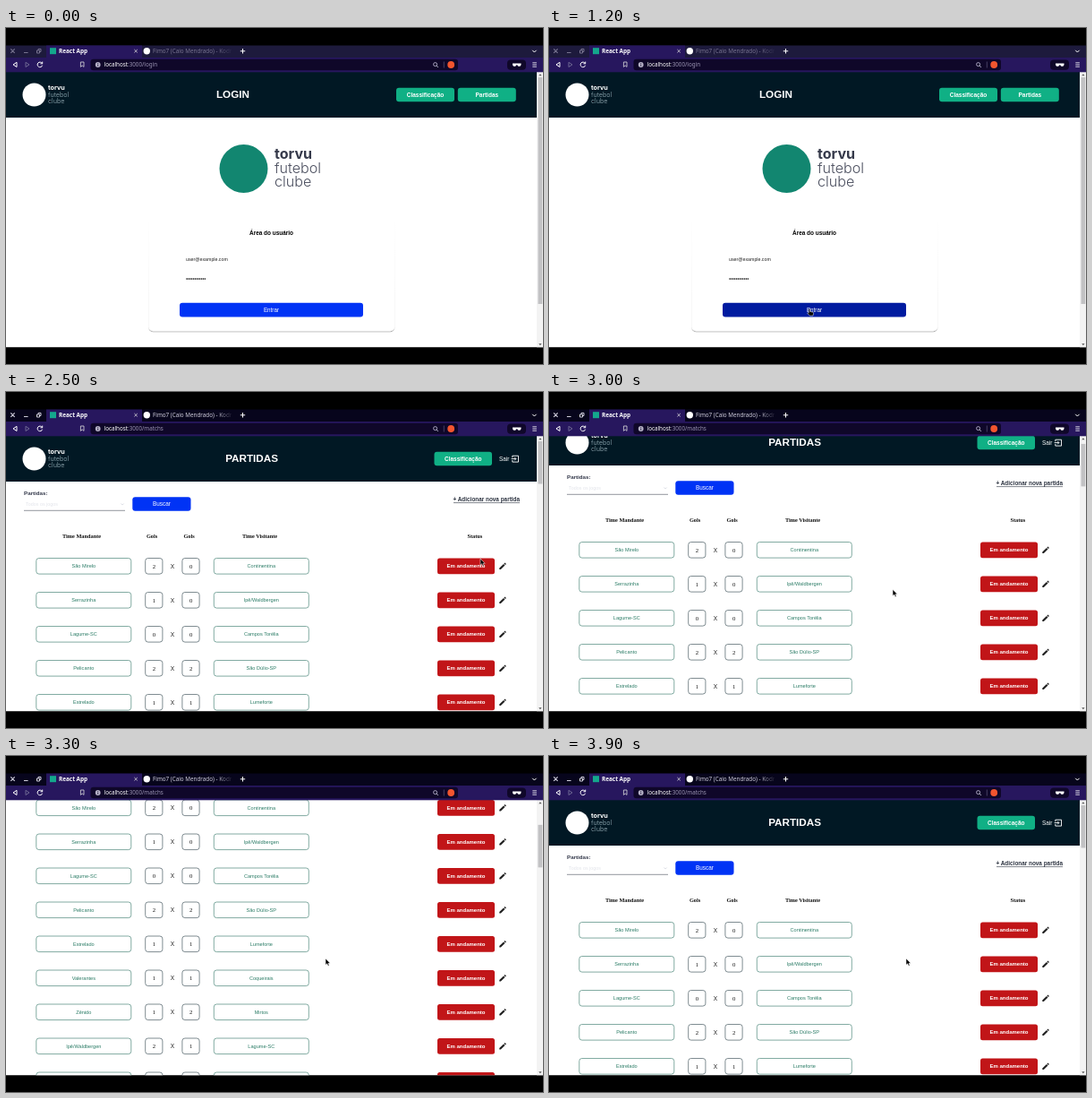
Write an HTML page that moves like this. It is 600 px wide and 375 px high and loops after 4 s.

```html
<!DOCTYPE html>
<html lang="pt">
<head>
<meta charset="utf-8">
<title>Partidas</title>
<style>
  html, body { margin: 0; width: 100%; height: 100%; overflow: hidden; background: #000; }
  svg { display: block; width: 600px; height: 375px; }
  text { font-family: "Liberation Sans", Arial, sans-serif; white-space: pre; }
  .ui { font-family: "Noto Sans", "Open Sans", sans-serif; }
  .serif { font-family: "Liberation Serif", "Times New Roman", serif; }
  .brand { font-family: Inter, sans-serif; }
  .b { font-weight: 700; }
  .m { text-anchor: middle; }
  .e { text-anchor: end; }
  .line { fill: none; stroke-width: 1; }
</style>
</head>
<body>
<svg id="stage" viewBox="0 0 600 375" xmlns="http://www.w3.org/2000/svg"></svg>
<script>
const LOOP = 4000, STEP = 100;
const FOCUS = 1300, LOADING = 1500, TABLE = 1700;

const text = (x, y, size, fill, cls, str, extra = '') =>
  `<text x="${x}" y="${y}" font-size="${size}" fill="${fill}" class="${cls}" ${extra}>${str}</text>`;
const rect = (x, y, w, h, fill, r = 0, extra = '') =>
  `<rect x="${x}" y="${y}" width="${w}" height="${h}" rx="${r}" fill="${fill}" ${extra}/>`;
const line = (d, stroke, extra = '') => `<path class="line" d="${d}" stroke="${stroke}" ${extra}/>`;
const button = (x, y, w, h, fill, label, cls = 'b', size = 6.5, id = '') =>
  rect(x, y, w, h, fill, 3, id && `id="${id}"`) +
  text(x + w / 2, y + h / 2 + 2.2, size, '#fff', cls + ' m', label);

const GREEN = '#10b085', BLUE = '#0033f5', NAVY = '#011824';

function brand(x, y, size, gap, bold, thin) {
  return ['torvu', 'futebol', 'clube'].map((word, i) =>
    text(x, y + i * gap, size, i ? thin : bold, 'brand', word,
      `font-weight="${i ? 300 : 700}"`)).join('');
}

const headerLogo = `<circle cx="31.5" cy="74.5" r="13" fill="#fff"/>` +
  brand(47, 69, 7.2, 7.6, '#fff', '#9fb4bd');

const exitIcon = line('M565.8 73.2V71.2h6.7v6.9h-6.7V76M564.6 74.6h5.2M568.2 72.9l1.7 1.7-1.7 1.7', '#fff',
  'style="stroke-width:.9"');

const menuButtons = button(478.5, 66.8, 64.5, 15.4, GREEN, 'Classificação') +
  text(551, 77, 6.4, '#fff', '', 'Sair') + exitIcon;

const addLink = text(574, 122.4, 6.4, '#2c3340', 'b e', '+ Adicionar nova partida') +
  line('M500 123.6h74', '#2c3340', 'style="stroke-width:.6"');

const filter = text(20, 114.5, 6.2, '#33384a', 'b', 'Partidas:') +
  text(22, 127, 5.4, '#e2e4ea', '', 'Todos os jogos') +
  line('M128.5 124.5l1.6 1.6 1.6-1.6', '#cfd2da', 'style="stroke-width:.7"') +
  line('M20 132.3h113', '#777c86', 'style="stroke-width:.8"') +
  button(141.3, 117.3, 65.2, 15.4, BLUE, 'Buscar', '', 6.4);

const title = (x, str) => text(x, 78.3, 11.7, '#fff', 'b m', str);

function loginPage() {
  let dots = '';
  for (let i = 0; i < 12; i++) dots += `<circle cx="${202 + i * 1.85}" cy="280" r=".8"/>`;
  return rect(0, 49, 594, 51, NAVY) + headerLogo + title(253.5, 'LOGIN') +
    button(436, 66.8, 65, 15.4, GREEN, 'Classificação') +
    button(504.8, 66.8, 65, 15.4, GREEN, 'Partidas') +
    `<circle cx="265.5" cy="157" r="27" fill="#128670"/>` +
    brand(300, 146, 16.1, 15.7, '#363a4b', '#4a4e5e') +
    rect(159.3, 212, 275, 126.3, '#fff', 5, 'filter="url(#shade)"') +
    rect(157, 206, 280, 110, 'url(#fade)') +
    text(296.5, 231, 6.45, '#000', 'b m', 'Área do usuário') +
    text(201, 260, 5.25, '#222', '', 'user@example.com') + dots +
    button(194, 306.8, 205, 15.6, BLUE, 'Entrar', '', 6.3, 'enter');
}

function loadingPage() {
  return rect(0, 49, 600, 51, NAVY) + title(278, 'PARTIDAS') +
    `<g transform="translate(6.5)">${menuButtons}${addLink}</g>` + filter +
    text(0, 147, 6.4, '#000', 'serif', 'Loading...');
}

const matches = [
  ['São Mirelo', 2, 0, 'Continentina'], ['Serrazinha', 1, 0, 'Ipê/Waldbergen'],
  ['Lagume-SC', 0, 0, 'Campos Torélia'], ['Pelicanto', 2, 2, 'São Dúlio-SP'],
  ['Estrelado', 1, 1, 'Lumeforte'], ['Valerantes', 1, 1, 'Coqueirais'],
  ['Zênido', 1, 2, 'Mirtos'], ['Ipê/Waldbergen', 2, 1, 'Lagume-SC'],
  ['Continentina', 0, 1, 'Estrelado'], ['Lumeforte', 1, 0, 'Zênido']
];

function matchRow([home, a, b, away], i) {
  const team = (x, name) => rect(x, -9, 106, 17.6, '#fff', 3, 'stroke="#588f83" stroke-width=".75"') +
    text(x + 53, 1.7, 5.6, '#2b7c66', 'm', name);
  const goals = (x, n) => rect(x, -9, 19.2, 17.6, '#fff', 3, 'stroke="#55666c" stroke-width=".75"') +
    text(x + 9.7, 2.4, 6.7, '#111', 'serif m', n);
  return `<g transform="translate(0 ${194.5 + 38 * i})">` +
    team(33.8, home) + goals(155.7, a) + text(186, 2.4, 6.6, '#222', 'm', 'X') +
    goals(196.9, b) + team(232.3, away) +
    rect(482, -9, 64, 17.8, '#c11518', 2.5) + text(514, 1.5, 6, '#fff', 'b m', 'Em andamento') +
    `<path transform="translate(550 -5.2) scale(.42)" fill="#222" d="M3 17.25V21h3.75L17.8 9.94 14.06 6.2zM20.7 7.04a1 1 0 0 0 0-1.41l-2.34-2.34a1 1 0 0 0-1.41 0l-1.83 1.83 3.75 3.75z"/></g>`;
}

function tablePage() {
  const heads = [[84.5, 'Time Mandante'], [163, 'Gols'], [204.5, 'Gols'],
    [283.5, 'Time Visitante'], [523.8, 'Status']];
  return rect(0, 49, 594, 51, NAVY) + headerLogo + title(274.6, 'PARTIDAS') +
    menuButtons + addLink + filter +
    heads.map(([x, s]) => text(x, 163.4, 6.3, '#111', 'serif b m', s)).join('') +
    matches.map(matchRow).join('');
}

function browser() {
  const w = '#fff', dim = '#6d6792';
  return rect(0, 19.5, 600, 14, '#1d1a3c', 0, 'id="strip"') + rect(45, 19.5, 107, 14, '#27175e') +
    rect(0, 33, 600, 16.3, '#27175e') +
    `<g id="chrome">` +
    line('M5.3 23.4l4.4 4.4M9.7 23.4l-4.4 4.4M20 27.5h4.6', 'currentColor', 'style="stroke-width:1.2"') +
    line('M34.5 25h3v3h-3zM36 25v-1.6h3v3h-1.5', 'currentColor') +
    text(164, 28.1, 6.3, 'currentColor', 'ui', 'Fimo7 (Caio Mendrado) - Kodnu', 'mask="url(#tabmask)"') + `</g>` +
    `<circle cx="157.3" cy="25.7" r="3.7" fill="#fff"/>` +
    rect(49, 22.2, 7, 7, '#14a78d') +
    text(59, 28.1, 6.4, w, 'ui', 'React App', 'font-weight="600"') +
    line('M143.4 24l3.4 3.4M146.8 24l-3.4 3.4', '#ddd', 'style="stroke-width:.8"') +
    line('M261.8 25.8h5.4M264.5 23.1v5.4M588.2 24.8l2.2 2.2 2.2-2.2', w) +
    line('M12 38.3v5.2L8 40.9z', w) + line('M22 38.3v5.2l4-2.6z', dim) +
    line('M40.3 39.4a2.8 2.8 0 1 0 .3 2.3M40.7 37.6v2.2h-2.2', w) +
    line('M83.4 38h3.6v5.4l-1.8-1.5-1.8 1.5z', '#ddd', 'style="stroke-width:.8"') +
    rect(94.5, 34.7, 410.5, 12.6, '#0f0729', 3) +
    `<circle cx="102.7" cy="41" r="2.9" fill="#b5b1c6"/>` +
    line('M102.7 40.6v2M102.7 39v.8', '#0f0729', 'style="stroke-width:.8"') +
    `<text class="ui" x="109.6" y="43.2" font-size="6.25" fill="#fff">localhost<tspan id="path" fill="#9a94b2"></tspan></text>` +
    `<circle class="line" cx="479.6" cy="40.6" r="2" stroke="#aaa5bf"/>` +
    line('M481.2 42.2l1.8 1.8', '#aaa5bf') + line('M489.3 37.5v7', '#5d567d', 'style="stroke-width:.7"') +
    `<circle cx="497.2" cy="41" r="3.9" fill="#f2552f"/>` +
    rect(560, 35.6, 21, 11.2, '#0f0729', 4) +
    `<path d="M566 39.6h9.5v1.2c0 2.4-3.6 2.8-4.2.4h-1c-.6 2.4-4.3 2-4.3-.4z" fill="#fff"/>` +
    line('M588.3 38.8h4.6M588.3 41h4.6M588.3 43.2h4.6', w, 'style="stroke-width:.8"');
}

const scrollbar = `<g id="bar">${rect(593, 49, 7, 308, '#f3f3f3')}` +
  `<path d="M595.2 53.2l1.7-2 1.7 2zM595.2 352.2l1.7 2 1.7-2z" fill="#555"/>` +
  rect(594.5, 55, 4.8, 48, '#c2c2c4', 0, 'id="thumb"') + `</g>`;

const stage = document.getElementById('stage');
stage.innerHTML = `<defs>
  <clipPath id="view"><rect y="49" width="600" height="307.3"/></clipPath>
  <linearGradient id="tabfade" gradientUnits="userSpaceOnUse" x1="236" x2="252" y1="0" y2="0">
    <stop stop-color="#fff"/><stop offset="1" stop-color="#fff" stop-opacity=".1"/></linearGradient>
  <mask id="tabmask" maskUnits="userSpaceOnUse" x="160" y="19" width="92" height="15">
    <rect x="160" y="19" width="92" height="15" fill="url(#tabfade)"/></mask>
  <linearGradient id="fade" x2="0" y2="1"><stop stop-color="#fff"/><stop offset="1" stop-color="#fff" stop-opacity="0"/></linearGradient>
  <filter id="shade"><feDropShadow dx="0" dy="1.1" stdDeviation=".7" flood-opacity=".34"/></filter></defs>
  <g clip-path="url(#view)">${rect(0, 49, 600, 308, '#fff')}
    <g id="login">${loginPage()}</g><g id="loading">${loadingPage()}</g><g id="table">${tablePage()}</g>${scrollbar}</g>
  ${browser()}
  <path id="arrow" d="M0 0v7.2l1.7-1.5 1.2 2.6 1.2-.6-1.1-2.4h2.2z" fill="#000" stroke="#fff" stroke-width=".5"/>
  <path id="hand" d="M-.8 .8q0-.9.8-.9t.8.9v2.2l3 .7q.9.3.8 1.2L4 7.6H.3L-2.2 4.9q.4-1 1.4-.2z" fill="#000" stroke="#fff" stroke-width=".5"/>`;

const el = Object.fromEntries([...stage.querySelectorAll('[id]')].map(n => [n.id, n]));
const show = (node, on) => node.setAttribute('display', on ? 'inline' : 'none');

// Each key: time, then values; eased between keys.
const pointer = [[600, 171, 141], [1000, 285, 311], [1100, 291, 313.5], [1300, 291, 313.5], [1500, 293, 312],
  [1700, 293, 312], [2300, 522, 200], [2500, 530, 186], [2700, 530, 190], [3100, 357, 226],
  [3700, 357, 226], [3900, 399, 226]];
const scroll = [[2900, 0], [3000, 18], [3100, 55.5], [3200, 105], [3400, 168], [3600, 120], [3700, 80.5], [3900, 0]];

function at(keys, t) {
  if (t <= keys[0][0]) return keys[0].slice(1);
  const i = keys.findIndex(k => k[0] >= t);
  if (i < 0) return keys[keys.length - 1].slice(1);
  const a = keys[i - 1], b = keys[i], u = (t - a[0]) / (b[0] - a[0]);
  const k = u * u * (3 - 2 * u);
  return a.slice(1).map((v, j) => v + (b[j + 1] - v) * k);
}

function draw(t) {
  const login = t < LOADING, table = t >= TABLE, focused = t >= FOCUS;
  show(el.login, login);
  show(el.loading, !login && !table);
  show(el.table, table);
  show(el.bar, login || table);

  const [y] = at(scroll, t);
  el.table.setAttribute('transform', `translate(0 ${-y})`);
  el.thumb.setAttribute('y', 55 + y * 0.16);
  el.thumb.setAttribute('height', login ? 253 : 47.5);

  el.path.textContent = login ? ':3000/login' : ':3000/matchs';
  el.strip.setAttribute('fill', focused ? '#07051c' : '#1d1a3c');
  el.chrome.setAttribute('color', focused ? '#cfcddb' : '#77738f');

  const [px, py] = at(pointer, t);
  const hover = login && t >= 600 && px > 194 && py > 306;
  el.enter.setAttribute('fill', hover ? '#001ba0' : BLUE);
  for (const c of [el.arrow, el.hand]) c.setAttribute('transform', `translate(${px} ${py})`);
  show(el.arrow, t >= 600 && !hover);
  show(el.hand, hover);
}

const start = performance.now();
function tick() {
  const t = (performance.now() - start) % LOOP;
  draw(Math.floor(t / STEP) * STEP);
  requestAnimationFrame(tick);
}
draw(0);
tick();
</script>
</body>
</html>
```
